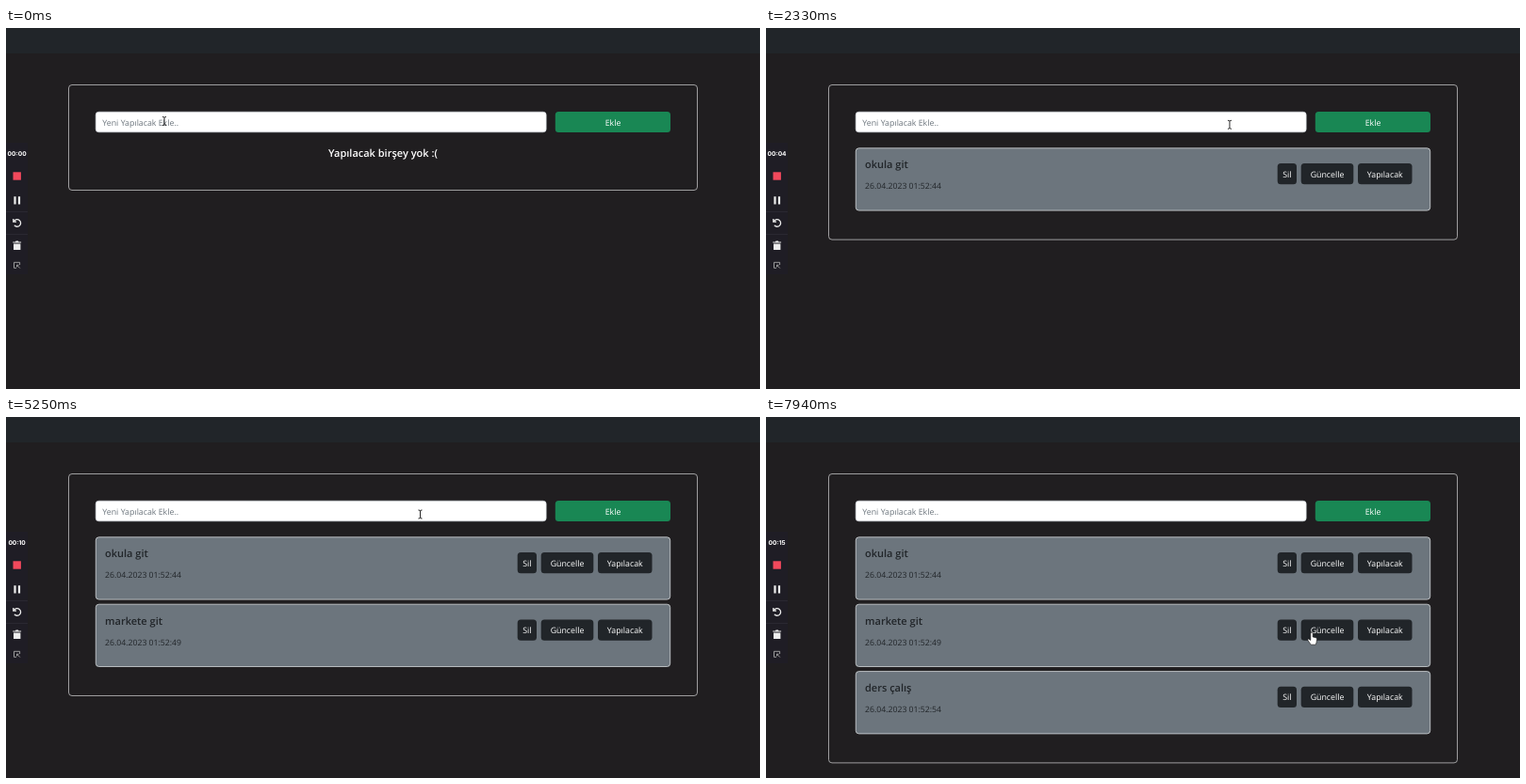
An HTML page for the animation above (8 s loop, 800 px wide and 384 px high).

```html
<!DOCTYPE html>
<html lang="tr">
<head>
<meta charset="utf-8">
<title>Yapılacaklar</title>
<style>
  html, body { margin: 0; width: 100%; height: 100%; overflow: hidden; background: #201e20; }
  svg { display: block; text-rendering: geometricPrecision; }
  text { font: 8.8px "Open Sans", "Noto Sans", sans-serif; fill: #212529; white-space: pre; }
  .title { font-size: 11px; font-weight: 600; }
  .date { font-size: 8.7px; }
  .light { fill: #fff; }
  .mid { text-anchor: middle; }
  .button { font-weight: 500; }
  .timer { font: 700 6.6px Inter, sans-serif; }
</style>
</head>
<body>
<svg width="800" height="384" viewBox="0 0 800 384">
  <rect width="800" height="27" fill="#212529"/>

  <g id="recorder">
    <rect y="122" width="23" height="140" fill="#1f1d25"/>
    <path d="M0 195.5H23M0 219.5H23" stroke="#2a2831"/>
    <text id="timer" class="timer light mid" x="11.6" y="136.2"></text>
    <rect x="7.5" y="153.3" width="8.4" height="8.4" fill="#f2495c"/>
    <path d="M8.4 179.3h2.2v8.2H8.4zM12.9 179.3h2.2v8.2h-2.2z" fill="#eee"/>
    <path d="M8.6 205.4A3.8 3.8 0 1 1 8.9 209.9M7.8 203v3.2H11" fill="none" stroke="#eee" stroke-width="1.3"/>
    <path d="M7.3 227.4h2.6l.6-.9h2.4l.6.9h2.6v1.2H7.3zM8 229.4h7.4v6.6H8z" fill="#eee"/>
    <path d="M11 255.3H8.5v-6H14.6V252M11.5 252.2l3.3 3.3M11.5 254.3v-2.1h2.1" fill="none" stroke="#aaa" stroke-width=".9"/>
  </g>

  <rect id="panel" x="66.5" y="60.5" width="667" rx="3.5" fill="none" stroke="#c9c9ca" stroke-width=".75"/>

  <rect id="glow" x="93" y="87" width="482.5" height="26" rx="5" fill="#0d6efd" fill-opacity=".3"/>
  <rect id="field" x="95.2" y="89.2" width="478" height="21.6" rx="3.3" fill="#fff" stroke-width=".6"/>
  <text id="entry" x="102.3" y="103.5"></text>
  <path id="caret" d="M0 95.5v9.5" stroke="#111" stroke-width=".8"/>

  <rect id="add" x="582.8" y="89" width="122.2" height="22" rx="3.5"/>
  <text class="button light mid" x="644" y="103.5">Ekle</text>

  <text id="empty" class="title light mid" x="400" y="136.8">Yapılacak birşey yok :(</text>
  <g id="cards"></g>

  <g id="cursor">
    <path id="beam" d="M-2-4.5Q0-4.5 0-3.5Q0-4.5 2-4.5M0-3.5V3.5M-2 4.5Q0 4.5 0 3.5Q0 4.5 2 4.5" fill="none" stroke="#111" stroke-width=".9"/>
    <path id="arrow" d="M0 0V9.2L2.2 7.2 3.8 10.6 5.4 9.9 3.9 6.6H6.8Z" fill="#fff" stroke="#111" stroke-width=".6"/>
    <path id="hand" d="M-1.2.8a1.2 1.2 0 0 1 2.4 0V4.5l3.3.8q1.2.4 1 1.8L5 10.4 4.2 12.7H-.8L-3.9 8.3q-.7-1.5.6-1.8L-1.2 8z" fill="#fff" stroke="#111" stroke-width=".6"/>
  </g>
</svg>

<script>
const LOOP = 8000;
const CLOCK_RATE = 1.94;   // recorded seconds per second of playback
const BLINK = 273;
const PRESS = 100;         // how long the add button is held
const GLIDE = 240;         // how long a pointer move takes
const LIFT = 20;           // height of the arc towards the add button
const CARD_STEP = 71.4;

const $ = id => document.getElementById(id);
const show = (node, on) => node.setAttribute('visibility', on ? 'visible' : 'hidden');

const tasks = [
  { text: 'okula git', focus: 300, typing: [510, 1540], add: 2200 },
  { text: 'markete git', focus: 2680, typing: [2900, 4300], add: 4860 },
  { text: 'ders çalış', focus: 5500, typing: [5680, 6640], add: 7340 },
];

// Pointer moves: start time and destination
const moves = [
  [-GLIDE, 168, 99],
  [1840, 623, 106.5], [2200, 392.5, 100],
  [4440, 658, 99], [4860, 439.5, 103.5], [5260, 496, 99],
  [6745, 652, 99], [7340, 652, 288], [7510, 579, 277], [7700, 579, 229.5],
];

// Button row laid out from its right edge
let right = 690.2;
const chips = [['Yapılacak', 57.5], ['Güncelle', 55.6], ['Sil', 20.3]].map(([label, w]) => {
  right -= w + 4.7;
  return { label, x: right + 4.7 - 4.7, w };
});

$('cards').innerHTML = tasks.map((task, i) => `
  <g transform="translate(0 ${i * CARD_STEP})">
    <rect x="95.3" y="127.8" width="609.4" height="66.3" rx="3.3" fill="#6c757d" stroke="#d5d8db" stroke-width=".8"/>
    <text class="title" x="105" y="149.3">${task.text}</text>
    <text class="date" x="105" y="171.4">26.04.2023 01:52:${44 + 5 * i}</text>
    ${chips.map(({ label, x, w }) => `
      <rect x="${x}" y="144" width="${w}" height="22.3" rx="3.5" fill="#212529"/>
      <text class="button light mid" x="${x + w / 2}" y="158.5">${label}</text>`).join('')}
  </g>`).join('');
const cards = [...$('cards').children];

const inside = (x, y, left, top, w, h) => x >= left && x <= left + w && y >= top && y <= top + h;
const overAddButton = (x, y) => inside(x, y, 583, 89, 122, 22);

function pointerAt(t) {
  const i = moves.findLastIndex(m => m[0] <= t);
  const [start, x, y] = moves[i];
  const [, x0, y0] = moves[Math.max(0, i - 1)];
  const end = Math.min(start + GLIDE, moves[i + 1]?.[0] ?? LOOP);
  const p = Math.min(1, (t - start) / (end - start));
  const e = p * p * (3 - 2 * p);
  const lift = overAddButton(x, y) ? LIFT * Math.sin(Math.PI * e * e) : 0;
  return [x0 + (x - x0) * e, y0 + (y - y0) * e - lift];
}

function drawField(t) {
  const task = tasks.find(k => t >= k.focus && t < k.add);
  const focused = !!task && t < task.add - PRESS;
  let typed = '', lastKey = task?.focus;
  if (task && t >= task.typing[0]) {
    const [from, to] = task.typing;
    const gap = (to - from) / (task.text.length - 1);
    const key = Math.floor((Math.min(t, to) - from) / gap + 1e-6);
    typed = task.text.slice(0, key + 1);
    lastKey = from + key * gap;
  }
  const entry = $('entry');
  entry.textContent = typed || 'Yeni Yapılacak Ekle..';
  entry.style.fill = typed ? '#212529' : '#6c757d';
  const end = typed ? entry.getComputedTextLength() : 0;
  $('caret').setAttribute('transform', `translate(${102.6 + end} 0)`);
  show($('caret'), focused && Math.floor((t - lastKey) / BLINK) % 2 === 0);
  show($('glow'), focused);
  $('field').setAttribute('stroke', focused ? '#5f93e0' : '#ced4da');
}

function drawPointer(t, count) {
  const [x, y] = pointerAt(t);
  const overField = inside(x, y, 95, 89, 479, 22);
  const overAdd = overAddButton(x, y);
  const overChip = cards.some((_, i) => i < count &&
    chips.some(c => inside(x, y, c.x, 144 + i * CARD_STEP, c.w, 22.3)));
  const pressed = tasks.some(k => t >= k.add - PRESS && t < k.add);
  $('add').setAttribute('fill', pressed ? '#146c43' : overAdd ? '#157347' : '#198754');
  $('cursor').setAttribute('transform', `translate(${x} ${y})`);
  show($('beam'), overField);
  show($('hand'), overAdd || overChip);
  show($('arrow'), !overField && !overAdd && !overChip);
}

function draw() {
  const t = performance.now() % LOOP;
  const count = tasks.filter(k => t >= k.add).length;
  const seconds = Math.floor(t / 1000 * CLOCK_RATE);
  $('timer').textContent = '00:' + String(seconds).padStart(2, '0');
  $('panel').setAttribute('height', count ? 93.2 + count * CARD_STEP : 112);
  show($('empty'), !count);
  cards.forEach((card, i) => show(card, i < count));
  drawField(t);
  drawPointer(t, count);
  requestAnimationFrame(draw);
}
draw();
</script>
</body>
</html>
```
